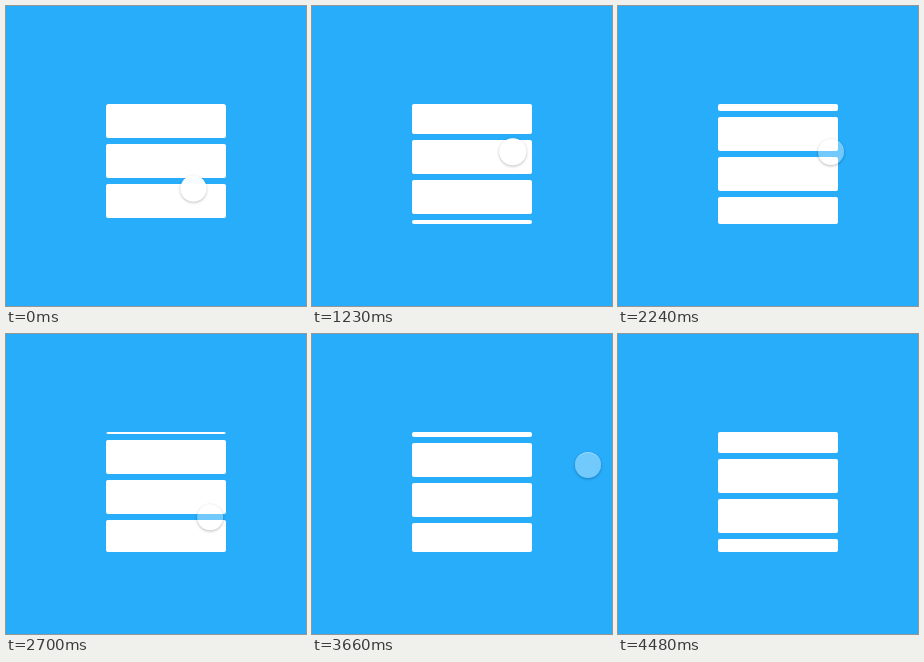
Recreate the animation shown at these times as an HTML page. Size 300x300 px, loop 4600 ms.

```html
<!DOCTYPE html>
<html lang="en">
<head>
<meta charset="utf-8">
<title>Touch scrolling list</title>
<style>
  html, body { margin: 0; width: 100%; height: 100%; overflow: hidden; background: #28adfb; }
  #list { position: absolute; left: 100px; top: 98px; width: 120px; height: 120px; overflow: hidden; border-radius: 2px; }
  .card { position: absolute; left: 0; top: 0; width: 120px; height: 34px; border-radius: 2px; background: #fff; }
  #touch {
    position: absolute; left: -13px; top: -13px; width: 26px; height: 26px; border-radius: 50%;
    box-shadow: 0 1px 3px rgba(0, 0, 0, .28), inset 0 1px 0 rgba(255, 255, 255, .3);
  }
</style>
</head>
<body>
<div id="list"></div>
<div id="touch"></div>
<script>
const LOOP = 4600, PITCH = 40;

// Each swipe pushes the list like a critically damped spring.
const swipes = [
  { start: 730, distance: 76.8, damping: 260 },
  { start: 1930, distance: 95, damping: 260 },
  { start: 2850, distance: 123.4, damping: 272 }
];

// Where the finger rests or turns round.
const stops = [
  { t: 320, x: 187.5, y: 182.5, r: 13 },
  { t: 460, x: 187, y: 198, r: 13 },
  { t: 730, x: 187, y: 198, r: 13 },
  { t: 1270, x: 201, y: 145, r: 13.5 },
  { t: 1960, x: 202, y: 191, r: 15 },
  { t: 2230, x: 213, y: 146, r: 13 },
  { t: 2740, x: 204, y: 184, r: 13 },
  { t: 3130, x: 217, y: 131, r: 13 },
  { t: 3380, x: 276, y: 131, r: 13 }
];

const mix = (a, b, k) => a + (b - a) * k;

function ease(time, from, to) {
  const u = Math.min(1, Math.max(0, (time - from) / (to - from)));
  return u * u * (3 - 2 * u);
}

function scroll(time) {
  return swipes.reduce((sum, { start, distance, damping }) => {
    const u = Math.max(0, time - start) / damping;
    return sum + distance * (1 - (1 + u) * Math.exp(-u));
  }, 0);
}

function finger(time) {
  const next = stops.findIndex(stop => stop.t > time);
  if (next === 0) return stops[0];
  if (next < 0) return stops[stops.length - 1];
  const a = stops[next - 1], b = stops[next], k = ease(time, a.t, b.t);
  return { x: mix(a.x, b.x, k), y: mix(a.y, b.y, k), r: mix(a.r, b.r, k) };
}

const list = document.getElementById('list');
const touch = document.getElementById('touch');
const cards = Array.from({ length: 4 }, () => {
  const card = document.createElement('div');
  card.className = 'card';
  return list.appendChild(card);
});

function draw(time) {
  const offset = Math.round(scroll(time)) % PITCH;
  cards.forEach((card, i) => {
    card.style.transform = `translateY(${i * PITCH - offset}px)`;
  });
  const { x, y, r } = finger(time);
  touch.style.transform = `translate(${x}px, ${y}px) scale(${r / 13})`;
  touch.style.backgroundColor = `rgba(255, 255, 255, ${mix(.96, .34, ease(time, 1270, 1840))})`;
  touch.style.opacity = 1 - ease(time, 3930, 4400);
}

const start = performance.now();
function tick() {
  draw((performance.now() - start) % LOOP);
  requestAnimationFrame(tick);
}
tick();
</script>
</body>
</html>
```
